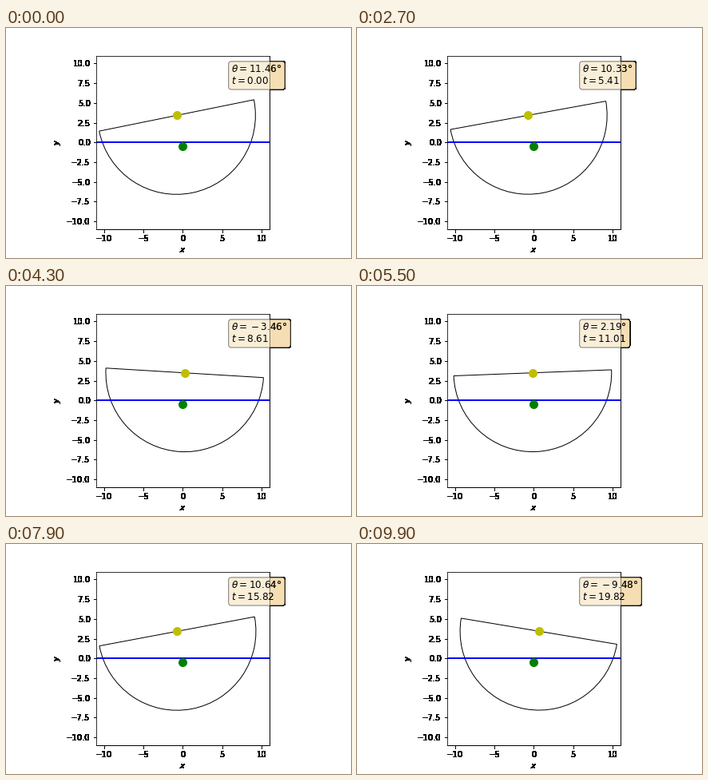
Animation of 432 by 288 pixels, one loop 10 s. Source, as a matplotlib script:

```python
import numpy as np
import matplotlib.pyplot as plt
from matplotlib.animation import FuncAnimation
from matplotlib.patches import Wedge

FRAMES = 100
RADIUS = 10
ARM = 4            # centre of the flat side to the centre of mass
MASS_Y = -0.5
THETA0 = 0.2       # rad
OMEGA = 2.40772    # rad/s
TIMES = np.linspace(0, 20, 1000)[::10]


def flatten_alpha(im, dpi):
    """Make every touched pixel opaque, giving hard edges outside the axes."""
    im = np.rint(im * 255).astype(np.uint8)
    im[..., 3] = np.where(im[..., 3] > 0, 255, 0)
    return im, 0, 0


def label(theta, t):
    deg = np.degrees(theta)
    sign = r"\hspace{0.2}{-}\hspace{0.2}" if deg < 0 else ""
    return rf"$\theta = {sign}{abs(deg):.2f}$°" + "\n" + rf"$t = {t:.2f}$"


fig = plt.figure(figsize=(6, 4), dpi=72, facecolor="white")
fig.subplots_adjust(left=0.125, right=0.9, bottom=0.125, top=0.88)
ax = fig.add_subplot(aspect="equal", xlim=(-11, 11), ylim=(-11, 11))
ax.set_xlabel("$x$")
ax.set_ylabel("$y$")
ax.set_agg_filter(flatten_alpha)

hull = ax.add_patch(Wedge((0, 0), RADIUS, 180, 360, fill=False, lw=1))
ax.axhline(0, color="b", lw=2)
ax.plot([0], [MASS_Y], "go", ms=10)
pivot, = ax.plot([], [], "yo", ms=10)
info = ax.text(0.78, 0.95, "", transform=ax.transAxes, fontsize=12, va="top",
               bbox=dict(boxstyle="round", facecolor="wheat", alpha=0.5))


def update(i):
    t = TIMES[i]
    theta = THETA0 * np.cos(OMEGA * t)
    x, y = -ARM * np.sin(theta), MASS_Y + ARM * np.cos(theta)
    tilt = np.degrees(theta)
    hull.set_center((x, y))
    hull.set_theta1(180 + tilt)
    hull.set_theta2(360 + tilt)
    pivot.set_data([x], [y])
    info.set_text(label(theta, t))
    return hull, pivot, info


anim = FuncAnimation(fig, update, frames=FRAMES, interval=100, repeat=True)
plt.show()
```
